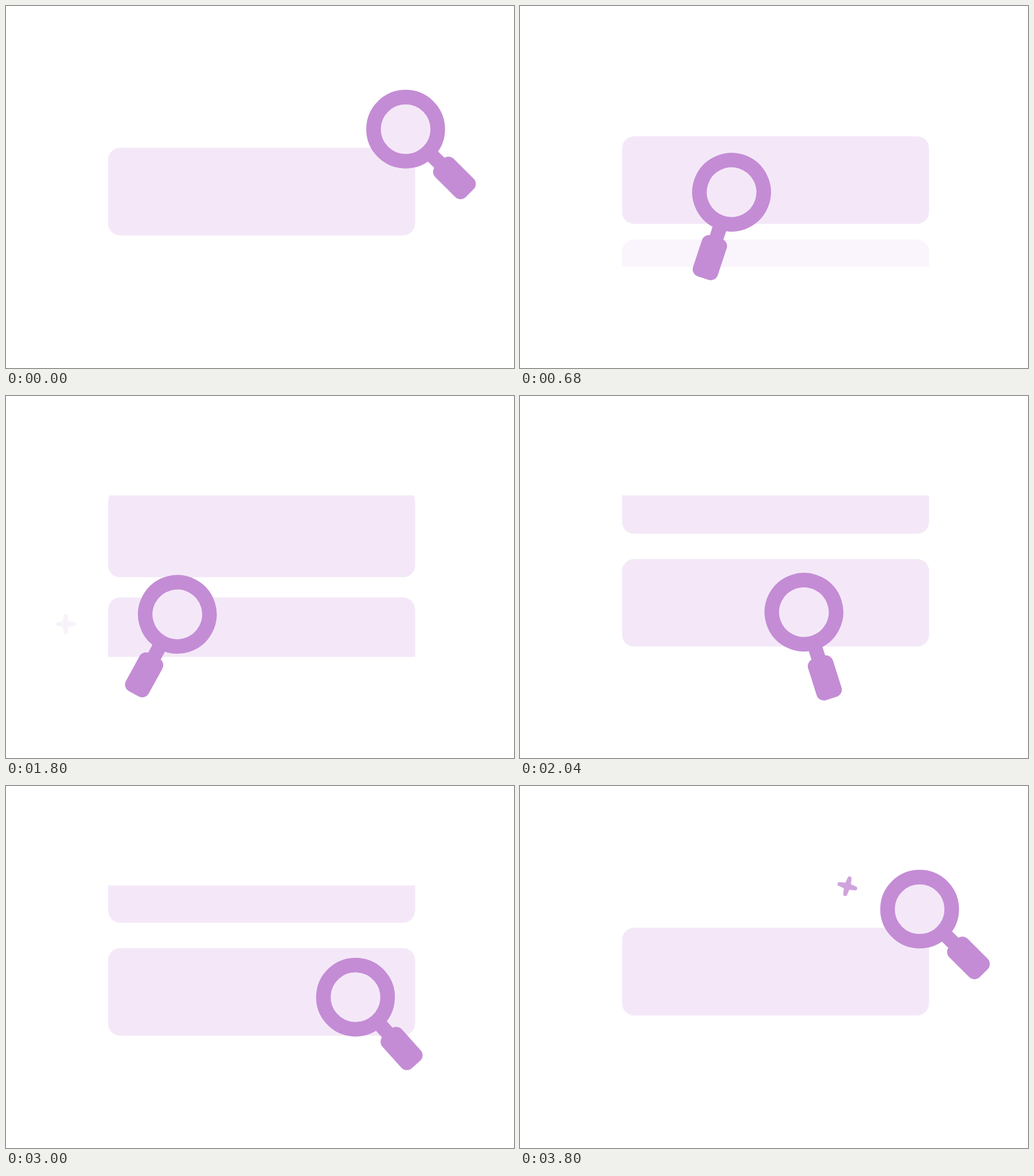
An HTML page that plays this animation: 886 px wide and 632 px high, repeating every 3840 ms.

```html
<!DOCTYPE html>
<html lang="en">
<head>
<meta charset="utf-8">
<title>Searching cards</title>
<style>
  html, body { margin: 0; width: 100%; height: 100%; overflow: hidden; background: #fff; }
  svg { display: block; width: 886px; height: 632px; }
  .light { fill: #f4e8f8; }
  .dark { fill: #c48cd5; }
</style>
</head>
<body>
<svg viewBox="0 0 886 632">
  <defs>
    <clipPath id="window"><rect x="170" y="173.5" width="550" height="282"/></clipPath>
    <path id="spark" d="M-5-5L-3.3-15.2A3.4 3.4 0 0 1 3.3-15.2L5-5L15.2-3.3A3.4 3.4 0 0 1 15.2 3.3L5 5L3.3 15.2A3.4 3.4 0 0 1-3.3 15.2L-5 5L-15.2 3.3A3.4 3.4 0 0 1-15.2-3.3Z"/>
  </defs>
  <g clip-path="url(#window)" class="light">
    <rect id="upper" x="178" y="247.5" width="535.5" height="153" rx="21"/>
    <rect id="lower" x="178" y="247.5" width="535.5" height="153" rx="21"/>
  </g>
  <g id="stars" class="dark">
    <use href="#spark"/><use href="#spark"/><use href="#spark"/>
  </g>
  <g id="glass" class="dark">
    <rect x="62" y="-12.5" width="40" height="25"/>
    <rect x="82.8" y="-22.7" width="75.2" height="45.4" rx="13"/>
    <circle r="56" class="light" stroke="#c48cd5" stroke-width="25.4"/>
  </g>
</svg>
<script>
const LOOP = 3840, STEP = 40, STAR_LIFE = 780;
const byId = id => document.getElementById(id);
const clamp = v => Math.max(0, Math.min(1, v));
const mix = (a, b, p) => a + (b - a) * p;

// Eased progress from 0 to 1 between two times.
function ease(t, from, to, power = 3) {
  const x = clamp((t - from) / (to - from));
  return x < .5 ? (2 * x) ** power / 2 : 1 - (2 - 2 * x) ** power / 2;
}

const right = { x: 697, y: 215, angle: 45 };
const left = { x: 225.5, y: 389, angle: 136 };
const low = { x: 596, y: 385, angle: 48.6 };
const moves = [
  { a: right, b: left, from: 0, to: 1180, bend: -13 },
  { a: left, b: low, from: 1408, to: 2476, bend: -11 },
  { a: low, b: right, from: 2600, to: LOOP, bend: 14 }
];
const stars = [
  { x: 104, y: 398, birth: 1110, turn: -42 },
  { x: 747, y: 444.5, birth: 2220, turn: -46 },
  { x: 571, y: 175, birth: 3640, turn: 20 }
];

function place(card, dy, opacity) {
  card.setAttribute('transform', `translate(0 ${dy})`);
  card.setAttribute('opacity', clamp(opacity));
}

function drawCards(t) {
  // 0: lower card centred, 1: upper card centred
  const scroll = ease(t, 0, 960) - ease(t, 1420, 2280, 1.5) + ease(t, 2670, 3567);
  place(byId('upper'), -202 * (1 - scroll), scroll * 5);
  place(byId('lower'), 178 * scroll, (1 - scroll) * 5);
}

function drawGlass(t) {
  const { a, b, from, to, bend } = moves.findLast(m => t >= m.from);
  const p = ease(t, from, to);
  const x = mix(a.x, b.x, p), y = mix(a.y, b.y, p) + bend * 4 * p * (1 - p);
  byId('glass').setAttribute('transform', `translate(${x} ${y}) rotate(${mix(a.angle, b.angle, p)})`);
}

function drawStars(t) {
  stars.forEach((star, i) => {
    const el = byId('stars').children[i], age = t - star.birth;
    const size = Math.min(1, .86 + age / 800);
    const turn = star.turn * clamp(1 - age / 700);
    el.setAttribute('opacity', age < 0 ? 0 : clamp(1 - age / STAR_LIFE));
    el.setAttribute('transform', `translate(${star.x} ${star.y}) rotate(${turn}) scale(${size})`);
  });
}

const start = performance.now();
function tick() {
  const t = Math.floor((performance.now() - start) % LOOP / STEP) * STEP;
  drawCards(t);
  drawGlass(t);
  drawStars(t);
  requestAnimationFrame(tick);
}
tick();
</script>
</body>
</html>
```
